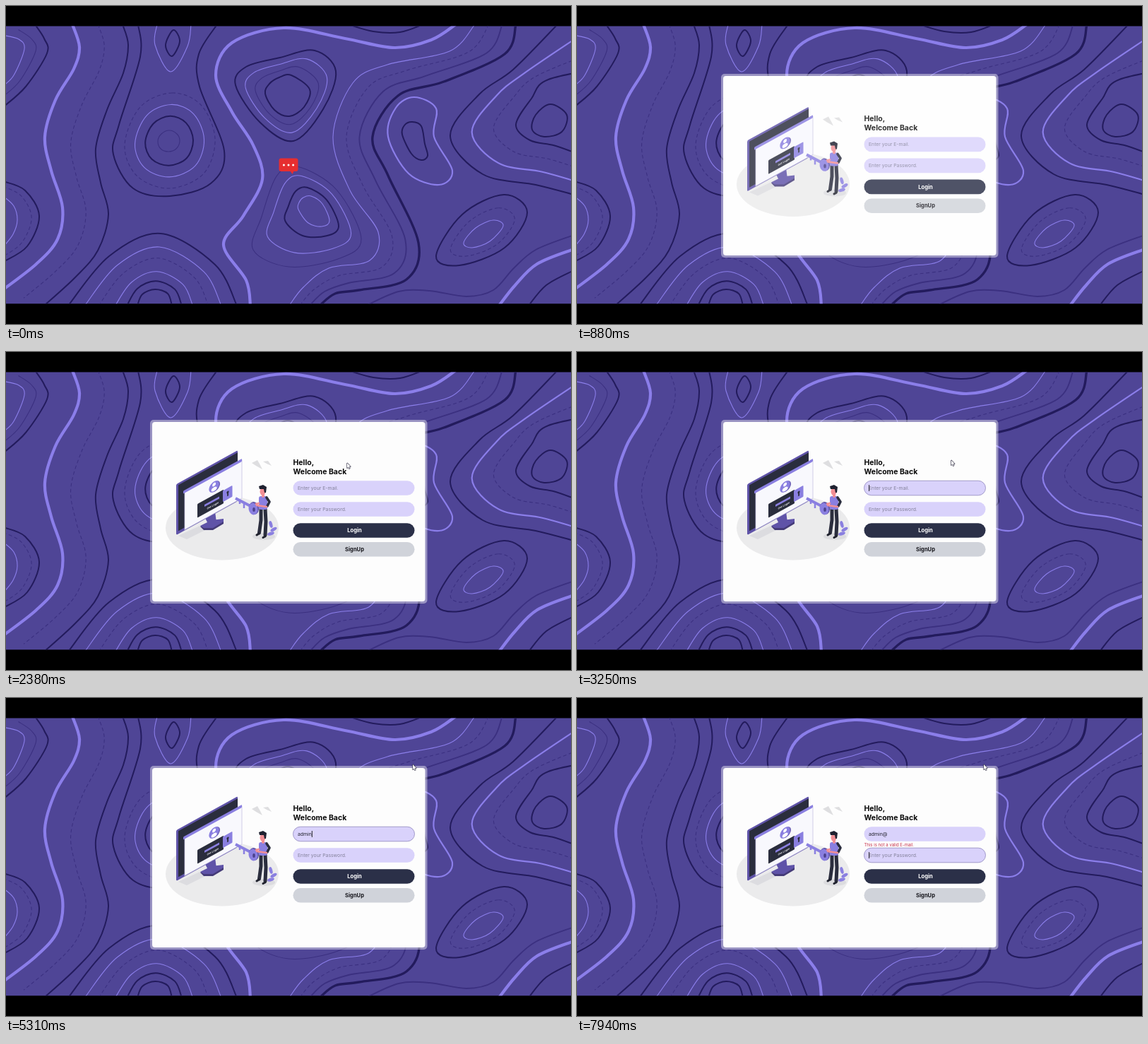
Recreate the animation shown at these times as an HTML page with a canvas. Size 800 px wide and 450 px high, loop 8 s.

```html
<!DOCTYPE html>
<html lang="en">
<head>
<meta charset="utf-8">
<title>Login form</title>
<style>
  html, body { margin: 0; width: 100%; height: 100%; overflow: hidden; background: #000; }
  canvas { display: block; width: 800px; height: 450px; }
</style>
</head>
<body>
<canvas id="stage" width="800" height="450"></canvas>
<script>
const LOOP = 8000;
const FONT = 'Inter, "Open Sans", sans-serif';
const CARD_AT = 250, FOCUS_AT = 2950, TAB_AT = 7500;
const KEYS = [['a', 4000], ['d', 4400], ['m', 4720], ['i', 5030], ['n', 5300], ['@', 5930]];
const INK = '#2a2d3d', VIOLET = '#8a7fe0', PLUM = '#5f53a8', SKIN = '#f28f95';

// Line styles: colour, width, dash
const LIGHT = ['#8b7eea', 1.1], LIGHT2 = ['#8b7eea', 2.2], BAND = ['#8b7eea', 4.2];
const DARK = ['#231b5d', 2], DARK3 = ['#231b5d', 3.4];
const MID = ['#3b3080', 1.1], MID2 = ['#3b3080', 1.9], DASH = ['#3b3080', 1.1, [5, 3.5]];

let ctx = document.getElementById('stage').getContext('2d');

// Smooth curve through a flat list of x, y points
function curve([color, width, dash = []], p, closed = false) {
  const n = p.length / 2;
  const at = i => {
    const k = closed ? (i + n) % n : Math.max(0, Math.min(n - 1, i));
    return [p[2 * k], p[2 * k + 1]];
  };
  ctx.beginPath();
  ctx.moveTo(p[0], p[1]);
  for (let i = 0; i < (closed ? n : n - 1); i++) {
    const a = at(i - 1), b = at(i), c = at(i + 1), d = at(i + 2);
    ctx.bezierCurveTo(b[0] + (c[0] - a[0]) / 6, b[1] + (c[1] - a[1]) / 6,
      c[0] - (d[0] - b[0]) / 6, c[1] - (d[1] - b[1]) / 6, c[0], c[1]);
  }
  ctx.strokeStyle = color;
  ctx.lineWidth = width;
  ctx.setLineDash(dash);
  ctx.stroke();
  ctx.setLineDash([]);
}

// Contours blended between two guides; each line is [style, share of the second guide]
function contours(lines, from, to, closed) {
  for (const [style, k] of lines) curve(style, from.map((v, i) => v + (to[i] - v) * k), closed);
}
const rings = (lines, from, to) => contours(lines, from, to, true);

function fill(color) {
  ctx.fillStyle = color;
  ctx.fill();
}
function poly(color, ...p) {
  ctx.beginPath();
  for (let i = 0; i < p.length; i += 2) ctx.lineTo(p[i], p[i + 1]);
  ctx.closePath();
  fill(color);
}
function oval(color, x, y, rx, ry = rx, turn = 0) {
  ctx.beginPath();
  ctx.ellipse(x, y, rx, ry, turn, 0, 7);
  fill(color);
}
function box(color, x, y, w, h, r = 0, edge) {
  ctx.beginPath();
  ctx.roundRect(x, y, w, h, r);
  fill(color);
  if (edge) { ctx.strokeStyle = edge; ctx.lineWidth = 0.8; ctx.stroke(); }
}
function stroke(color, width, ...p) {
  ctx.beginPath();
  for (let i = 0; i < p.length; i += 2) ctx.lineTo(p[i], p[i + 1]);
  ctx.strokeStyle = color;
  ctx.lineWidth = width;
  ctx.lineJoin = 'round';
  ctx.stroke();
}
function text(s, x, y, size, color, weight = 400, align = 'left') {
  ctx.font = `${weight} ${size}px ${FONT}`;
  ctx.textAlign = align;
  ctx.fillStyle = color;
  ctx.fillText(s, x, y);
}

function drawContours() {
  // Left edge
  contours([[LIGHT, 0], [MID, 0.5], [DARK, 1]],
    [-6, 41, 18, 47, 26, 61, 11, 98, -4, 113], [41, 26, 54, 46, 58, 67, 28, 114, -4, 143]);
  contours([[BAND, 0], [DASH, 0.51], [DARK, 1]],
    [94, 26, 104, 58, 96, 89, 70, 133, 55, 185, 64, 233, 80, 285, 73, 330, 43, 365, -5, 402],
    [165, 26, 173, 55, 166, 95, 143, 147, 127, 202, 134, 250, 145, 295, 130, 346, 98, 384, 54, 424]);
  contours([[LIGHT, 0], [DASH, 0.65], [DARK, 1]],
    [-4, 269, 11, 283, 16, 303, 10, 323, -4, 341], [-4, 248, 27, 261, 47, 297, 30, 340, -4, 362]);
  // Bell, its rings and the arches below
  curve(DARK, [187, 26, 190, 72, 160, 168, 152, 210, 180, 258, 232, 269, 290, 251, 309, 205, 274, 114, 273, 68, 299, 26]);
  curve(LIGHT, [214, 26, 211, 55, 233, 93, 257, 57, 262, 26]);
  curve(DARK, [237, 34, 246, 50, 235, 71, 226, 55], true);
  rings([[DASH, 0], [LIGHT, 0.31], [DARK, 0.62], [MID, 1]],
    [235, 123, 276, 140, 296, 188, 280, 237, 232, 258, 186, 241, 168, 197, 190, 143],
    [231, 176, 242, 181, 246, 191, 241, 202, 230, 206, 219, 202, 215, 191, 220, 181]);
  contours([[DARK, 0], [LIGHT, 0.24], [DASH, 0.44], [LIGHT, 0.68], [DARK, 0.85], [DARK, 1]],
    [88, 424, 146, 354, 219, 322, 296, 366, 327, 424], [186, 424, 193, 408, 211, 401, 229, 407, 235, 424]);
  // Centre
  curve(BAND, [637, 26, 602, 48, 550, 59, 480, 46, 393, 31, 320, 52, 297, 98, 320, 150, 350, 197, 363, 245, 336, 297, 308, 338, 340, 388, 346, 424]);
  curve(DARK, [484, 26, 520, 36, 558, 37, 591, 26]);
  rings([[DARK, 0], [LIGHT, 0.34], [MID, 0.67], [DARK, 1]],
    [437, 63, 467, 92, 449, 146, 407, 191, 360, 165, 325, 112, 340, 86, 388, 73],
    [404, 98, 430, 118, 422, 143, 401, 156, 380, 147, 367, 124, 373, 110, 387, 101]);
  rings([[MID, 0], [LIGHT, 0.32], [DARK, 0.71], [LIGHT, 1]],
    [412, 227, 468, 260, 503, 330, 470, 358, 400, 369, 350, 345, 362, 298, 383, 241],
    [432, 269, 448, 280, 458, 304, 447, 312, 428, 307, 414, 288, 415, 278, 421, 271]);
  contours([[LIGHT, 0], [DASH, 0.34], [MID2, 0.67], [DARK3, 1]],
    [664, 26, 628, 64, 540, 83, 491, 109, 463, 185, 487, 261, 527, 320, 515, 360, 457, 371, 421, 398, 401, 424],
    [722, 26, 706, 68, 620, 107, 555, 127, 519, 185, 541, 240, 584, 335, 567, 387, 500, 402, 466, 407, 444, 424]);
  rings([[LIGHT2, 0], [DARK, 1]],
    [578, 129, 609, 145, 606, 185, 632, 233, 613, 253, 570, 237, 541, 185, 552, 144],
    [575, 164, 588, 170, 593, 195, 597, 212, 588, 218, 574, 209, 561, 182, 564, 169]);
  // Right edge
  contours([[DARK, 0], [LIGHT2, 0.33], [DASH, 0.66], [DARK, 1]],
    [781, 26, 718, 90, 670, 125, 629, 184, 675, 238, 750, 253, 804, 267],
    [860, 85, 768, 104, 744, 131, 722, 168, 742, 190, 775, 197, 804, 207]);
  curve(DARK, [771, 139, 794, 154, 787, 178, 762, 185, 745, 175, 750, 154], true);
  rings([[DARK, 0], [DASH, 0.52], [LIGHT, 1]],
    [705, 267, 738, 292, 706, 342, 642, 367, 609, 354, 646, 295],
    [690, 303, 704, 311, 685, 333, 660, 342, 648, 335, 665, 314]);
  curve(MID2, [510, 424, 556, 404, 600, 403, 652, 411, 690, 402, 719, 371, 750, 345, 804, 324]);
  curve(BAND, [698, 424, 721, 395, 752, 365, 804, 344]);
  curve(DARK, [740, 424, 765, 395, 804, 374]);
}

// The screen is laid out flat and sheared into the wall plane
function drawMonitor() {
  poly('#dcdce0', 244, 260, 296, 236, 306, 240, 256, 265);
  poly(PLUM, 281, 233, 296, 226, 298, 241, 287, 245);
  poly('#453b78', 275, 247, 291, 239, 308, 237, 308, 243, 293, 252, 280, 252);
  poly(PLUM, 275, 246, 291, 238, 308, 236, 308, 240, 293, 249, 280, 249);
  ctx.save();
  ctx.transform(1, -0.55, 0, 1, 241, 187);
  box(PLUM, 0, 0, 87, 72, 2);
  box(INK, 3, 3, 84, 65);
  box('#f8f8fd', 12, 17, 81, 54, 0, '#c5c0e2');
  box(VIOLET, 10, 15, 83, 4, 1);
  oval(PLUM, 55, 33.5, 7);
  oval(VIOLET, 53.6, 33, 7.3);
  oval('#fff', 53.6, 30, 2.5);
  oval('#fff', 53.6, 36.5, 4, 2.8);
  box(INK, 30, 44.5, 37, 19.5, 1);
  box(VIOLET, 40, 51, 21, 3);
  text('Get Login', 43.5, 60, 3.6, '#fff', 600);
  box(VIOLET, 66, 45.5, 13.5, 16, 1);
  oval(INK, 73, 51.5, 1.6);
  box(INK, 72.2, 52, 1.8, 5);
  ctx.restore();
}

function drawPerson() {
  oval('#dcdcdf', 365, 261, 16, 5);
  // Plant
  for (const [x, y, turn] of [[375, 244, 1.3], [379, 251, -0.5], [375, 257, -0.3]]) {
    oval(VIOLET, x, y, 5, 2.3, turn);
  }
  // Key
  stroke(VIOLET, 4, 325, 207, 348, 219);
  for (const x of [331, 337]) stroke(VIOLET, 2.5, x, x - 122, x, x - 116);
  oval(PLUM, 351, 221, 7, 9, -0.2);
  oval(VIOLET, 350, 222, 6.4, 8.5, -0.2);
  oval('#4b418c', 351, 223, 1.8, 3);
  // Body
  ctx.lineCap = 'round';
  stroke(INK, 5, 361, 222, 361, 238, 358.5, 256);
  stroke(INK, 5, 367, 222, 368, 240, 367, 259);
  stroke('#20222e', 3, 358, 257, 355, 259);
  stroke('#20222e', 3, 367, 261, 364, 262.5);
  box(VIOLET, 358, 204, 12, 19, 3);
  stroke(INK, 3.6, 369, 206, 373, 212, 370, 218);
  stroke(SKIN, 2.6, 369, 219, 355, 217);
  stroke(SKIN, 2.6, 358, 214, 354, 215);
  stroke(SKIN, 4, 364, 200, 364, 204);
  ctx.lineCap = 'butt';
  oval(SKIN, 363.5, 197.5, 4, 5.2);
  poly('#1f2130', 358, 190, 364, 188, 369, 191, 368, 199, 366, 199, 365, 194, 359, 194);
}

function drawPicture() {
  oval('#ebebec', 306, 249, 80, 45.5);
  poly('#dedee0', 348, 157, 356, 153, 360, 160, 363, 166, 354, 161);
  poly('#dedee0', 364, 155, 371, 154, 376, 161, 369, 158);
  drawMonitor();
  drawPerson();
}

const caretOn = since => since >= 0 && since % 1060 < 530;

function drawPill(color, y, edge) {
  box(color, 406.5, y, 172, 20.6, 10.3, edge);
}
function drawField(y, hint, value, focusedFor) {
  drawPill('#d9d2fb', y, focusedFor >= 0 && '#8f86bd');
  text(value || hint, 413, y + 12.6, 6.85, value ? '#22222c' : '#83809a');
  if (caretOn(focusedFor)) {
    const x = 413.6 + (value ? ctx.measureText(value).width : 0);
    stroke('#111', 0.9, x, y + 5.8, x, y + 14.8);
  }
}
function drawButton(y, label, color, ink) {
  drawPill(color, y);
  text(label, 493.5, y + 13, 7.6, ink, 700, 'center');
}

function drawForm(t) {
  const typed = KEYS.filter(k => t >= k[1]);
  const lastKey = typed.length ? typed[typed.length - 1][1] : FOCUS_AT;
  const onMail = t >= FOCUS_AT && t < TAB_AT;
  text('Hello,', 406.5, 159.5, 10.5, '#080808', 700);
  text('Welcome Back', 406.5, 172.8, 10.5, '#080808', 700);
  drawField(182.2, 'Enter your E-mail.', typed.map(k => k[0]).join(''), onMail ? t - lastKey : -1);
  drawField(212.2, 'Enter your Password.', '', t - TAB_AT);
  if (t >= TAB_AT) text('This is not a valid E-mail.', 406.5, 210, 6, '#c8324b');
  drawButton(242.2, 'Login', '#2b3048', '#fff');
  drawButton(269, 'SignUp', '#d0d3da', '#16161c');
}

function drawCard(t) {
  const p = Math.min(1, (t - CARD_AT) / 760);
  box('rgba(255,255,255,0.42)', 204, 96, 392.5, 260, 5);
  box('#fdfdfd', 207, 99, 386.5, 254, 4);
  ctx.save();
  ctx.translate(0, 20 * (1 - p));
  drawPicture();
  drawForm(t);
  ctx.restore();
  // The card is plain, so veiling it fades its content in
  if (p < 1) box(`rgba(253,253,253,${1 - p})`, 207, 99, 386.5, 254, 4);
}

function drawBubble() {
  box('#e62e30', 386.5, 215.5, 27, 18.5, 3);
  poly('#e62e30', 402, 233, 408, 233, 405.5, 238);
  for (const x of [393.4, 400, 406.6]) oval('#fff', x, 225, 1.5);
}

// Pointer moves: start, end, target
const HOME = [52, 41];
const MOVES = [[1820, 2380, 483, 157], [2480, 2780, 500, 191], [3080, 3480, 576, 94]];

function drawPointer(t) {
  if (t < 1100) return;
  let [x, y] = HOME;
  for (const [from, to, tx, ty] of MOVES) {
    const u = Math.max(0, Math.min(1, (t - from) / (to - from)));
    const e = u * u * (3 - 2 * u);
    x += (tx - x) * e;
    y += (ty - y) * e;
  }
  if (x > 407 && x < 578 && y > 183 && y < 203) {
    stroke('#333', 0.9, x, y - 4, x, y + 4);
    return;
  }
  ctx.save();
  ctx.translate(x, y);
  const arrow = [0, 0, 0, 7.2, 1.6, 5.7, 2.7, 8.1, 3.9, 7.6, 2.8, 5.2, 5, 5.1];
  stroke('#26243a', 1.2, ...arrow, 0, 0);
  poly('#fff', ...arrow);
  ctx.restore();
}

// The backdrop never changes, so it is painted once
const backdrop = document.createElement('canvas');
backdrop.width = 800;
backdrop.height = 450;
const screen2d = ctx;
ctx = backdrop.getContext('2d');
ctx.fillStyle = '#000';
ctx.fillRect(0, 0, 800, 450);
ctx.beginPath();
ctx.rect(0, 28.4, 800, 392.8);
ctx.clip();
ctx.fillStyle = '#4f4596';
ctx.fillRect(0, 0, 800, 450);
drawContours();
ctx = screen2d;

const start = performance.now();
function frame() {
  const t = (performance.now() - start) % LOOP;
  ctx.drawImage(backdrop, 0, 0);
  if (t < CARD_AT) drawBubble();
  else drawCard(t);
  drawPointer(t);
  requestAnimationFrame(frame);
}
frame();
</script>
</body>
</html>
```
